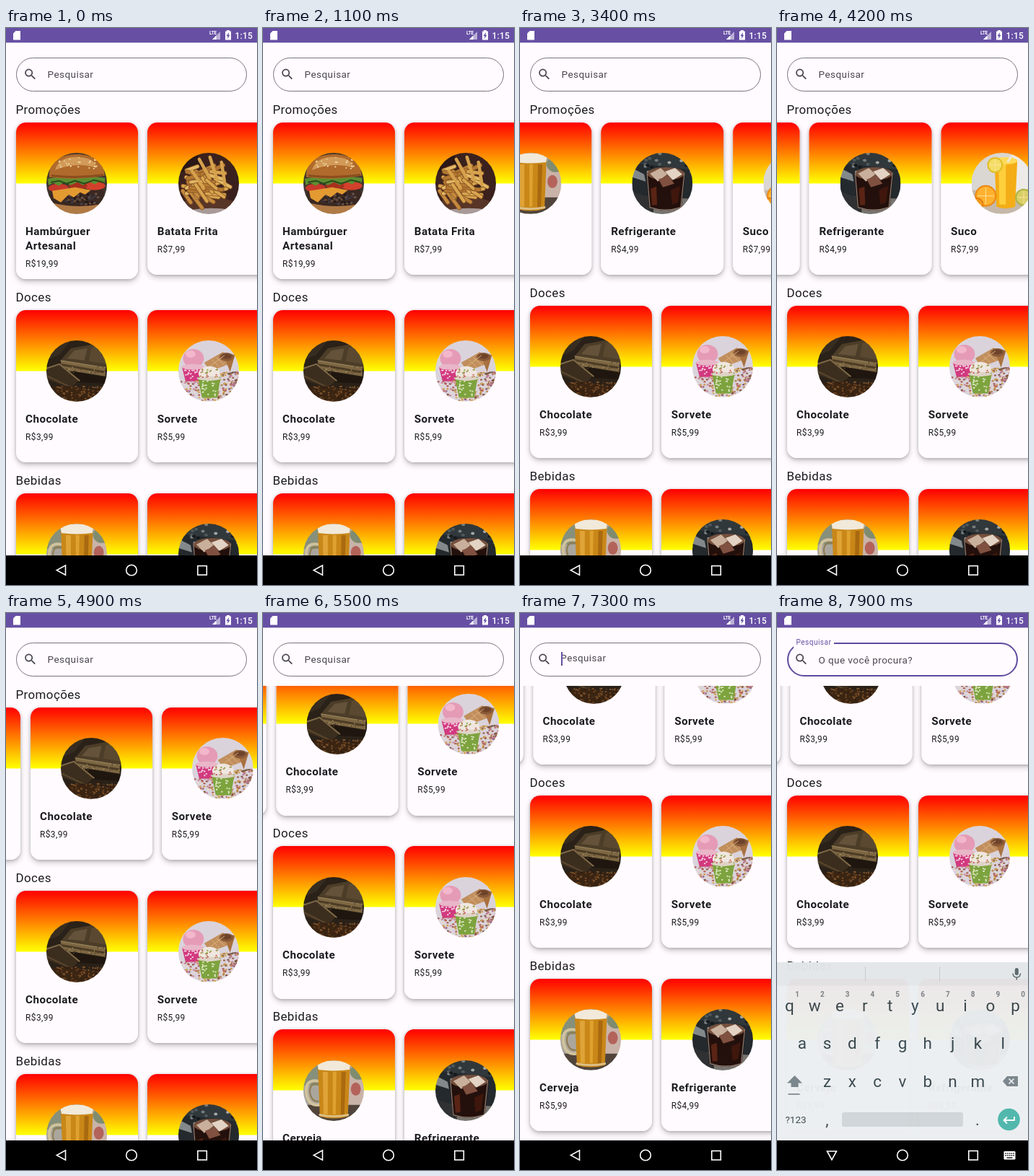
An HTML page for the animation above (8 s loop, 348 by 772 pixels).

```html
<!DOCTYPE html>
<html lang="pt">
<head>
<meta charset="utf-8">
<title>Cardápio</title>
<style>
html, body { margin: 0; width: 100%; height: 100%; overflow: hidden; }
body { position: relative; background: #fffbff; color: #1c1b1f; font-family: Roboto, sans-serif; letter-spacing: .42px; }
svg { display: block; }
div, #ui, #keys { position: absolute; }
#stage { left: 0; top: 0; width: 348px; height: 772px; overflow: hidden; }
#view { left: 0; top: 101px; width: 348px; height: 630px; overflow: hidden; }
#list { left: 0; top: -101px; width: 348px; }
.section { left: 0; width: 348px; }
.heading { left: 13.5px; top: 0; font-size: 16.9px; line-height: 24px; }
.row { left: 0; top: 29.8px; }
.card { width: 169.3px; height: 211.4px; border-radius: 13.5px; background: linear-gradient(#f00, #ff0 84px, #fffbff 85px); box-shadow: 0 4px 8px #0003, 0 1px 4px #0003; }
.card.tall { height: 217px; }
.photo { left: 42.3px; top: 42.3px; width: 84.6px; height: 84.6px; border-radius: 50%; overflow: hidden; }
.photo svg { filter: blur(.6px); }
.info { left: 13.5px; top: 141.2px; width: 142px; font-size: 11.85px; line-height: 16px; }
.info b { display: block; font-size: 15.23px; line-height: 20.3px; margin-bottom: 6.5px; }
#field { left: 13.5px; top: 40.5px; width: 320.5px; height: 47px; border-radius: 24px; box-sizing: border-box; border: 1px solid #79747e; }
#label, #hint { color: #49454f; font-size: 13.54px; line-height: 16px; white-space: nowrap; }
#label { padding: 0 3.4px; }
#hint { left: 57.5px; top: 56.5px; }
#caret { left: 57.4px; top: 54px; width: 1.7px; height: 19px; background: #6750a4; }
#ui, #keys { left: 0; top: 0; }
#keys { letter-spacing: 0; }
</style>
</head>
<body>
<div id="stage">
  <div id="view"><div id="list"></div></div>
  <div id="field"></div>
  <div id="label">Pesquisar</div>
  <div id="hint">O que você procura?</div>
  <div id="caret"></div>
  <svg id="keys" width="348" height="772"></svg>
  <svg id="ui" width="348" height="772">
    <rect width="348" height="20.3" fill="#6750a4"/>
    <g fill="#fff">
      <path d="M13.5 4H20V16.500H10V7.500Z"/>
      <path d="M297 5V16H286Z" opacity=".55"/><path d="M291.500 10.500V16H286Z"/>
      <text x="282" y="9" font-size="6.500" font-weight="700" letter-spacing="-.2">LTE</text>
      <path d="M306 4.500V3H310V4.500H312V16.500H304V4.500Z"/>
      <path d="M309 6L305.500 11H307.500L307 15L310.500 9.700H308.500Z" fill="#6750a4"/>
      <text x="317.500" y="14.800" font-size="12" font-weight="500" letter-spacing=".2">1:15</text>
    </g>
    <path transform="translate(23.600 54) scale(.846)" fill="#49454f" d="M15.500 14h-.79l-.28-.27A6.470 6.470 0 0 0 16 9.500 6.500 6.500 0 1 0 9.500 16c1.610 0 3.090-.59 4.230-1.570l.27.28v.79l5 4.990L20.490 19l-4.990-5zm-6 0C7.010 14 5 11.990 5 9.500S7.010 5 9.500 5 14 7.010 14 9.500 11.990 14 9.500 14z"/>
    <rect y="731" width="348" height="41"/>
    <g fill="none" stroke="#fff" stroke-width="1.600">
      <path id="back"/>
      <circle cx="174" cy="751.500" r="7.300"/>
      <rect x="265.800" y="745.500" width="12.500" height="12.500"/>
    </g>
    <g id="switcher">
      <rect x="314.500" y="746" width="16" height="11.500" rx="1.300" fill="#fff"/>
      <path d="M316.500 749H329M316.500 751.800H329" stroke="#000" stroke-width="1.400" stroke-dasharray="1.500 1.200"/>
      <path d="M318.500 755H326.500" stroke="#000" stroke-width="1.300"/>
    </g>
  </svg>
</div>
<script>
const $ = id => document.getElementById(id);

// Seeded repetition for sprinkles, crumbs and sticks
function scatter(count, seed, draw) {
  const rnd = (a, b) => {
    seed = (seed * 16807) % 2147483647;
    return a + (b - a) * seed / 2147483647;
  };
  return Array.from({ length: count }, () => draw(rnd)).join('');
}
const path = (d, fill, extra = '') => `<path d="${d}" fill="${fill}" ${extra}/>`;
const line = (d, color, w) => path(d, 'none', `stroke="${color}" stroke-width="${w}" stroke-linecap="round" stroke-linejoin="round"`);
const oval = (x, y, rx, ry, fill) => `<ellipse cx="${x}" cy="${y}" rx="${rx}" ry="${ry}" fill="${fill}"/>`;
const backdrop = fill => `<rect width="85" height="85" fill="${fill}"/>`;
const pick = (r, colors) => colors[Math.floor(r(0, colors.length))];
const dots = (n, seed, [x0, x1, y0, y1], size, colors) =>
  scatter(n, seed, r => oval(r(x0, x1), r(y0, y1), size, size * .8, pick(r, colors)));

const art = {
  burger: backdrop('#40352f') +
    path('M5 67Q43 60 81 67Q76 85 43 85Q10 85 5 67Z', '#b07a45') +
    path('M7 50H78Q84 60 78 71Q45 78 9 70Q2 60 7 50Z', '#3a2822') +
    dots(45, 5, [28, 76, 57, 72], 2, ['#66534a', '#25191a', '#6a4c38', '#3d3a44']) +
    oval(17, 49, 14, 6, '#c7382b') + oval(67, 46, 15, 6, '#d3402b') + oval(44, 46, 13, 5, '#a9301f') +
    path('M8 53L40 48L62 52L54 58L47 55L38 62L31 58L20 69L10 63Z', '#e39a31') +
    path('M2 36Q43 29 82 35L81 42L74 39L68 44L59 40L51 45L43 41L34 45L25 41L17 46L10 42L3 45Z', '#5d8d30') +
    line('M7 41L18 39L28 43L40 39L53 43L66 38L79 41', '#2a4a1c', 2) +
    path('M4 34C2 13 20 2 42 2S81 12 81 32Q43 39 4 34Z', '#b06a2c') +
    path('M12 24C17 9 29 5 46 6S69 14 70 21Q42 12 12 24Z', '#d29a58') +
    line('M8 32Q43 36 78 31', '#8b4d1d', 3) +
    dots(24, 11, [18, 70, 5, 22], 1.2, ['#f4deb0', '#e9c98c']),
  fries: backdrop('#3b211d') + oval(12, 14, 20, 13, '#2a1716') +
    oval(42, 76, 43, 14, '#573527') + oval(46, 84, 36, 7, '#a89a98') +
    scatter(44, 29, r => {
      const x = r(6, 52), y = r(22, 60), a = r(-.5, 1.1), n = r(16, 28);
      const d = `M${x} ${y}l${n * Math.cos(a)} ${n * Math.sin(a)}`;
      return line(d, '#8d5826', 6) + line(d, pick(r, ['#d9a650', '#c58b3d', '#e2b966', '#b37831']), 4.2);
    }) +
    line('M29 9L43 34M44 6L54 38M60 13L65 45M19 25L35 49', '#d6a14c', 4.5),
  hotdog: backdrop('#49392d') + line('M0 20H85M0 35H85', '#32271f', 2) +
    path('M2 56L66 50L85 62V73L40 79Z', '#b88b59') +
    path('M21 42Q48 22 85 27V59Q52 66 25 55Z', '#c87a31') +
    line('M26 45Q52 30 85 36', '#4f8130', 8) + line('M25 47Q52 35 85 41', '#a93d20', 8) +
    line('M27 46L35 39L40 44L47 36L54 42L62 34L69 41L80 34', '#efb537', 2.2) +
    path('M23 51Q51 43 85 47V58Q51 66 23 51Z', '#dda052') +
    oval(13, 57, 9, 5, '#73963a') + oval(33, 68, 9, 4, '#dbb153') + dots(18, 9, [8, 55, 55, 70], 2, ['#789d38', '#c8a73d', '#a73c24']),
  beer: backdrop('#aaa69d') + path('M0 0H25V35H0Z', '#87907a') + path('M60 18H85V65H60Z', '#c9b3a8') +
    oval(73, 40, 7, 9, '#b3635a') + oval(78, 16, 13, 11, '#7f8c70') + path('M0 62H85V85H0Z', '#51443b') +
    line('M22 29Q3 25 4 44Q6 64 22 62', '#d0c29c', 4) + line('M21 33Q9 31 9 44Q11 58 21 57', '#8f7b50', 2) +
    path('M20 6H65L62 78Q42 84 23 78Z', '#c98718') + path('M27 16H34V75H28Z', '#dfa338') +
    path('M41 16H46L45 75H41Z', '#e0a22f') + path('M53 16H59L57 76H52Z', '#a9690f') +
    line('M23 76Q42 80 62 76', '#dcc189', 3) +
    path('M19 3Q42 -2 66 3L64 13Q42 16 21 13Z', '#f1e9da'),
  soda: backdrop('#24292d') + path('M0 0H85V24L0 14Z', '#31383b') +
    path('M2 22L17 30L19 40L0 34Z', '#83898b') +
    dots(22, 31, [0, 85, 0, 30], 2.5, ['#777e80', '#15191c', '#a5a8a5', '#50595b']) +
    path('M0 60L85 64V85H0Z', '#77736e') + path('M0 54L30 64V85H0Z', '#2f3132') +
    path('M20 28Q46 18 74 28L69 76Q45 84 24 76Z', '#23100c') +
    path('M26 50L34 47L35 72L28 73Z', '#5a2415') + path('M54 52L67 46L64 69L56 72Z', '#3f170d') +
    oval(47, 29, 26, 9, '#74503d') + path('M25 29L40 21L49 30L36 40Z', '#c9b09c') +
    path('M46 26L60 21L70 30L57 38Z', '#e3d3c4') + path('M37 37L51 32L59 43L43 48Z', '#805040') +
    line('M21 28L25 76Q46 83 68 76L73 28', '#917d70', 1.2),
  juice: backdrop('#dad6d2') + path('M0 52H85V85H0Z', '#c5b8aa') + path('M57 0H85V46L60 62Z', '#eeeae7') +
    path('M32 10H64L61 75Q48 80 35 75Z', '#f4ad16') + path('M38 16H48V72H39Z', '#ffcf3d') +
    oval(48, 11, 16, 5, '#ffda5a') + line('M51 12L60 -2', '#ece8db', 3) +
    [[33, 17, 11, '#e1bd27', '#f4dd65'], [20, 60, 15, '#ec8810', '#ffb12e'], [73, 62, 12, '#aeb342', '#d8cf67'], [7, 72, 10, '#e67d0c', '#f39b1f']]
      .map(([x, y, r, rim, pulp]) => oval(x, y, r, r, rim) + oval(x, y, r - 2, r - 2, pulp) +
        line(`M${x - r + 4} ${y}h${2 * r - 8}M${x} ${y - r + 4}v${2 * r - 8}`, '#ffe29a', 1)).join(''),
  water: backdrop('#a9c9d6') + path('M0 60H85V85H0Z', '#7899a8') + path('M24 12H62L58 75H28Z', '#e0f1f6') +
    path('M26 30H60L57 72H29Z', '#8bbfd3') + oval(43, 30, 17, 4, '#c8e6f0'),
  chocolate: backdrop('#2a2118') + path('M0 0H34L18 20L0 28Z', '#372c20') +
    path('M20 28L34 11L85 2V34L82 40Z', '#4c3d28') +
    path('M29 25L39 14L57 11L53 28Z', '#64523a') + path('M59 29L63 10L85 6V33Z', '#5a4930') +
    path('M20 28L82 38V50L21 40Z', '#7d6743') + line('M22 34L80 44', '#4d3c25', 3) + line('M20 28L82 38', '#a08a61', 1) +
    path('M21 41L82 51V60L42 58Z', '#1f160f') +
    path('M0 38L18 32L46 55L34 66L0 54Z', '#3c2e1e') + line('M0 39L18 33L46 56', '#7f6a48', 2) + line('M2 50L33 65', '#59462d', 2) +
    path('M0 68Q25 60 48 66T85 60V85H0Z', '#3a2412') +
    dots(110, 17, [6, 80, 64, 85], 1.4, ['#6a4321', '#4c2d16', '#7d532c', '#2d1b10']) +
    dots(30, 41, [28, 82, 36, 46], .9, ['#a58e63', '#66502f', '#4d3a23']),
  icecream: backdrop('#dad3dc') +
    path('M36 31L62 16L74 32L44 43Z', '#c18f5d') + path('M62 17L79 20L72 44Z', '#a8713f') +
    oval(67, 23, 10, 6, '#8a5a38') + oval(67, 22, 7, 3.5, '#6e432a') +
    line('M47 27L58 38M53 24L65 35M44 36L64 21', '#dbb07e', 1) +
    path('M5 37H35L31 57H10Z', '#d2397f') + dots(18, 8, [9, 31, 41, 54], 1.3, ['#f6d5e2']) +
    oval(21, 25, 14.5, 13, '#e59bb6') + oval(17, 19, 7, 5, '#f2b7ca') + oval(20, 37, 15, 4, '#e9b6c8') +
    dots(190, 73, [2, 84, 56, 85], 1.6, ['#cf9f52', '#b2645c', '#e6dacb', '#7b5238', '#c98a9d', '#b98a55', '#815c75']) +
    dots(55, 12, [58, 85, 44, 62], 1.6, ['#cfa258', '#9d6750', '#e3d5c4', '#b8768a', '#7b5a48']) +
    path('M27 51H59L54 80H33Z', '#7da33e') + dots(22, 19, [33, 53, 57, 77], 1.3, ['#dce6bf']) +
    oval(43, 46, 15, 10, '#efe6df') + oval(43, 53, 16, 3, '#dfd3c8') +
    dots(20, 29, [31, 55, 40, 52], 1.2, ['#c9545c', '#87a63d', '#b98558'])
};

const products = {
  burger: ['Hambúrguer Artesanal', '19,99'], fries: ['Batata Frita', '7,99'], hotdog: ['Hot Dog', '9,99'],
  beer: ['Cerveja', '5,99'], soda: ['Refrigerante', '4,99'], juice: ['Suco', '7,99'], water: ['Água', '2,99'],
  chocolate: ['Chocolate', '3,99'], icecream: ['Sorvete', '5,99']
};
const pitch = 182.7;
const card = (id, i) => `<div class="card ${id === 'burger' ? 'tall' : ''}" style="left:${13.6 + i * pitch}px">
  <div class="photo"><svg viewBox="0 0 85 85">${art[id]}</svg></div>
  <div class="info"><b>${products[id][0]}</b>R$${products[id][1]}</div></div>`;
const sections = [
  ['Promoções', Object.keys(products)],
  ['Doces', ['chocolate', 'icecream']],
  ['Bebidas', ['beer', 'soda']]
];
$('list').innerHTML = sections.map(([name, ids]) => `<div class="section">
  <div class="heading">${name}</div><div class="row">${ids.map(card).join('')}</div></div>`).join('');
const blocks = [...document.querySelectorAll('.section')];
const promo = document.querySelector('.row');

function buildKeyboard() {
  const text = (x, y, s, size, more = '') => `<text x="${x}" y="${y}" font-size="${size}" ${more}>${s}</text>`;
  const step = 34.8;
  const row = (s, x, y) => [...s].map((c, i) => text(x + i * step, y, c, 22.5)).join('');
  $('keys').innerHTML = `<rect y="484" width="348" height="248" fill="#eceff1"/>
    <rect y="484" width="348" height="32.500" fill="#e3e7e9"/>
    <path d="M122.500 490V510M225.500 490V510" stroke="#c5cbce"/>
    <g fill="#37474f" text-anchor="middle">
      ${row('qwertyuiop', 17.4, 552)}${row('asdfghjkl', 34.8, 604)}${row('zxcvbnm', 69.5, 657)}
      ${[...'1234567890'].map((c, i) => text(28 + i * step, 532, c, 10, 'font-weight="700" fill="#78848a"')).join('')}
      ${text(26, 707, '?123', 13.5)}${text(69.5, 710, ',', 22)}${text(278, 710, '.', 22)}
    </g>
    <rect x="90" y="692" width="168" height="20" rx="3" fill="#cfd5d8"/>
    <g fill="#78848a">
      <path d="M24.500 641L35 651.500H29.500V657H19.500V651.500H14Z"/><rect x="15.500" y="666" width="16" height="1.700"/>
      <path d="M319 642H334V656H319L313 649Z"/>
    </g>
    <path d="M321.500 645.500L328.500 652.500M328.500 645.500L321.500 652.500" stroke="#eceff1" stroke-width="1.700"/>
    <rect x="329.800" y="492" width="5" height="10" rx="2.500" fill="#59666c"/>
    <path d="M327 499.500Q327.500 505 332.300 505T337.600 499.500M332.300 505V508.500" fill="none" stroke="#59666c" stroke-width="1.500"/>
    <circle cx="321.500" cy="702" r="15.300" fill="#4db6ac"/>
    <path d="M329 698V703H315M319 698.500L314.500 703L319 707.500" fill="none" stroke="#fff" stroke-width="1.800"/>`;
}
buildKeyboard();

const clamp = x => Math.max(0, Math.min(1, x));
const span = (t, a, b) => clamp((t - a) / (b - a));
const easeOut = (x, power) => 1 - (1 - x) ** power;

function draw(t) {
  const drag = span(t, 2200, 2800);
  const sideways = 157.5 * drag * drag * (3 - 2 * drag) + 542 * easeOut(span(t, 2800, 4000), 3) +
    575 * easeOut(span(t, 4200, 5200), 3);
  const down = 132 * easeOut(span(t, 5300, 6200), 2.5);
  promo.style.transform = `translateX(${-sideways}px)`;
  // The first row shrinks once its tallest card has left
  const shrink = sideways > 183 ? 6 : 0;
  blocks.forEach((b, i) => b.style.top = [101, 361 - shrink, 615 - shrink][i] - down + 'px');

  const lift = t < 7300 ? 0 : t < 7400 ? .04 : t < 7700 ? .5 : 1;
  const focused = t >= 7400, open = t >= 7700;
  $('field').style.border = focused ? '2px solid #5f4a9f' : '1px solid #79747e';
  Object.assign($('label').style, {
    left: 54.2 - 31 * lift + 'px',
    top: 56.2 - 23 * lift + 'px',
    fontSize: 13.54 - 3.39 * lift + 'px',
    color: focused ? '#6750a4' : '#49454f',
    background: open ? '#fffbff' : 'none'
  });
  $('hint').style.opacity = open ? 1 : 0;
  $('caret').style.opacity = t >= 7300 && t < 7800 ? 1 : 0;

  const rise = span(t, 7600, 7900);
  $('keys').style.opacity = .97 * rise;
  $('keys').style.transform = `translateY(${24 * (1 - rise)}px)`;
  $('back').setAttribute('d', open ? 'M69.500 746H82.500L76 757.800Z' : 'M82.500 744.800V758.200L70.300 751.500Z');
  $('switcher').style.opacity = open ? 1 : 0;
}

// The screen refreshes ten times a second
function tick() {
  draw(Math.floor(performance.now() % 8000 / 100) * 100);
  requestAnimationFrame(tick);
}
tick();
</script>
</body>
</html>
```
